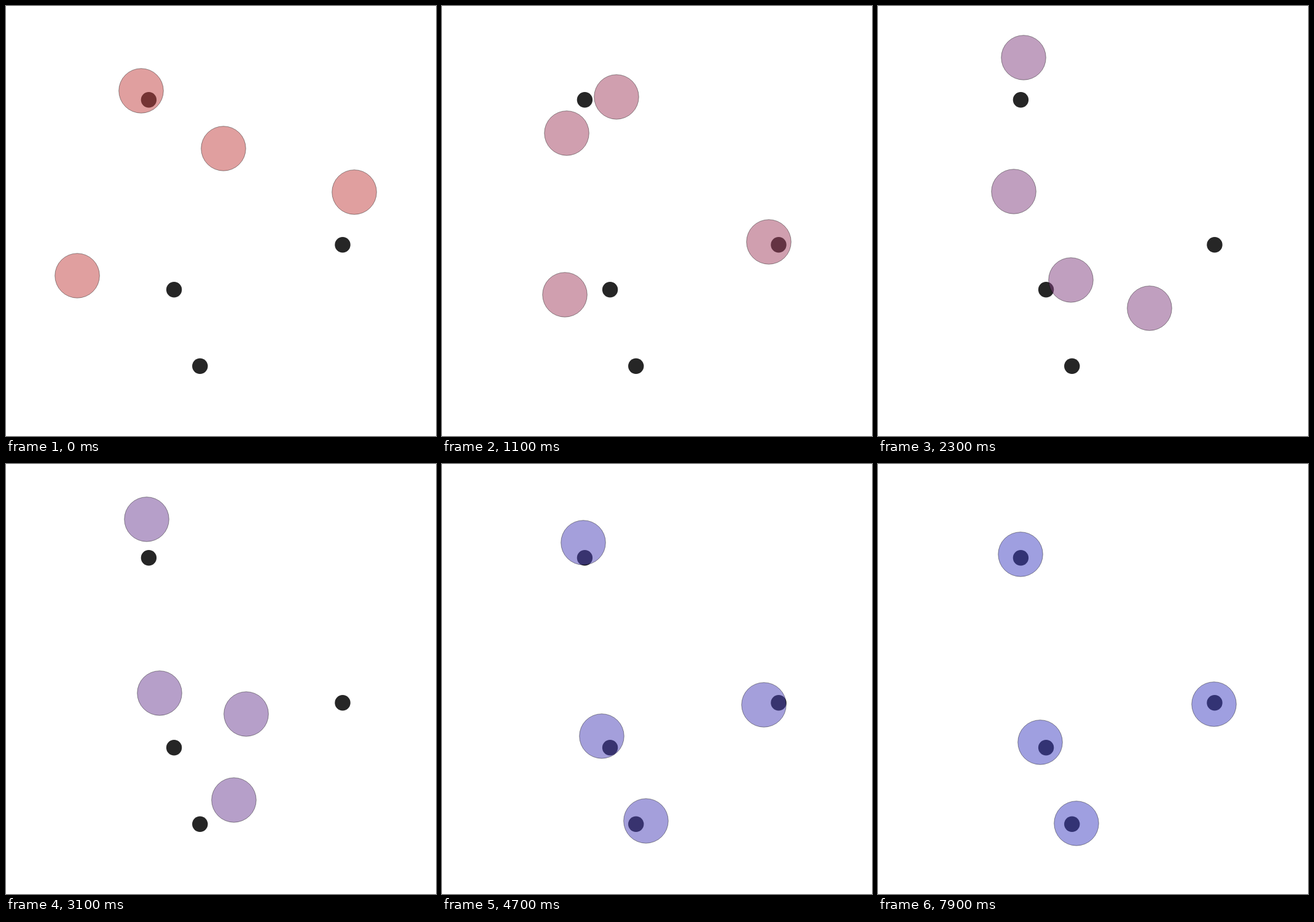
An HTML page with a canvas for the animation above (8000 ms loop, 700 by 700 pixels).

```html
<!DOCTYPE html>
<html>
<head>
<meta charset="utf-8">
<style>
html, body { margin: 0; width: 100%; height: 100%; overflow: hidden; background: #fff; }
canvas { display: block; }
</style>
</head>
<body>
<canvas id="stage" width="700" height="700"></canvas>
<script>
const ctx = document.getElementById('stage').getContext('2d');
const LOOP = 8000, STEP = 100;

const goals = [[232.4, 152.7], [548, 388.8], [273.6, 461.8], [315.8, 586.2]];

// waypoints of each agent, passed at these times (in steps)
const times = [0, 11, 23, 31, 47, 63, 79];
const paths = [
  [[220, 138], [203, 207], [221, 302], [250, 373], [260, 443], [264, 451], [264, 453]],
  [[354, 232], [284, 148], [237, 84], [229, 90], [230, 128], [232, 142], [232, 147]],
  [[567, 303], [532, 384], [442, 492], [371, 547], [332, 581], [328, 585], [323, 585]],
  [[116, 439], [200, 470], [314, 446], [391, 407], [524, 392], [542, 392], [547, 391]]
];

// slope at waypoint i, from the parabola through three neighbours
function slope(path, i, axis) {
  const m = Math.min(Math.max(i, 1), times.length - 2);
  const rate = j => (path[j + 1][axis] - path[j][axis]) / (times[j + 1] - times[j]);
  const bend = (rate(m) - rate(m - 1)) / (times[m + 1] - times[m - 1]);
  return rate(m - 1) + bend * (2 * times[i] - times[m] - times[m - 1]);
}

// smooth curve through the waypoints
function position(path, t) {
  let i = 0;
  while (i < times.length - 2 && t >= times[i + 1]) i++;
  const h = times[i + 1] - times[i], u = (t - times[i]) / h, w = 1 - u;
  return [0, 1].map(axis =>
    w * w * ((1 + 2 * u) * path[i][axis] + u * h * slope(path, i, axis)) +
    u * u * ((1 + 2 * w) * path[i + 1][axis] - w * h * slope(path, i + 1, axis)));
}

function disc([x, y], r, fill) {
  ctx.beginPath();
  ctx.arc(x, y, r, 0, 2 * Math.PI);
  ctx.fillStyle = fill;
  ctx.fill();
}

function draw(ms) {
  const t = Math.floor(ms % LOOP / STEP);
  // red cools to blue as the agents arrive
  const warm = 128 * Math.max(0, 1 - t / 53) ** 1.2;
  const tint = `rgba(${65 + warm}, 65, ${193 - warm}, .5)`;
  ctx.clearRect(0, 0, 700, 700);
  for (const goal of goals) disc(goal, 12.7, '#262626');
  ctx.strokeStyle = 'rgba(0, 0, 0, .4)';
  for (const path of paths) {
    disc(position(path, t), 36.3, tint);
    ctx.stroke();
  }
}

const start = performance.now();
function tick() {
  draw(performance.now() - start);
  requestAnimationFrame(tick);
}
tick();
</script>
</body>
</html>
```
